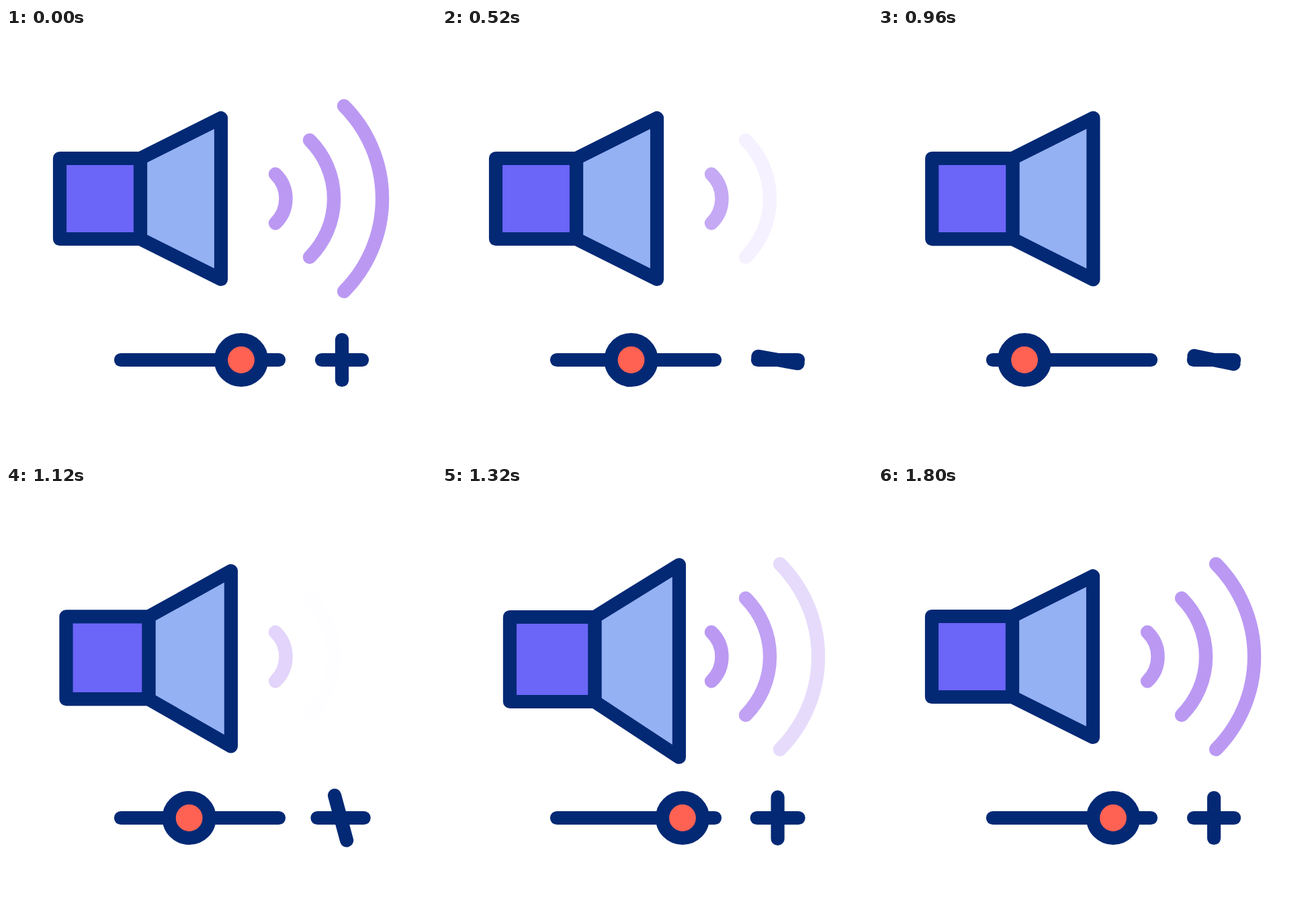
An HTML page that plays this animation: 640x640 px, repeating every 2000 ms.

```html
<!DOCTYPE html>
<html lang="en">
<head>
<meta charset="utf-8">
<title>Volume</title>
<style>
  html, body { margin: 0; width: 100%; height: 100%; overflow: hidden; background: #fff; }
  svg { display: block; width: 100vw; height: 100vh; }
  .line { stroke: #032975; stroke-width: 20.2; stroke-linecap: round; stroke-linejoin: round; }
  .wave { stroke: #bb99f3; stroke-width: 20.4; stroke-linecap: round; fill: none; }
</style>
</head>
<body>
<svg viewBox="0 0 640 640">
  <path id="cone" class="line" fill="#94b1f3"/>
  <path id="box" class="line" fill="#6b65f8"/>
  <path id="wave1" class="wave" d="M401 217.5A50.7 50.7 0 0 1 401 290.5"/>
  <path id="wave2" class="wave" d="M452 167A123 123 0 0 1 452 341"/>
  <path id="wave3" class="wave" d="M503 116A195.5 195.5 0 0 1 503 392"/>
  <path class="line" d="M171 494H406"/>
  <circle id="knob" class="line" cy="494" r="30" fill="#ff6152"/>
  <g id="lobes" fill="#032975">
    <circle cy="489" r="5"/>
    <circle cy="499" r="5"/>
  </g>
  <path id="bar" class="line"/>
  <path id="crossbar" class="line"/>
</svg>
<script>
const LOOP = 2000, STEP = 40;
const el = id => document.getElementById(id);
const lerp = (a, b, p) => a + (b - a) * p;

function ease(t, start, end) {
  const p = Math.min(1, Math.max(0, (t - start) / (end - start)));
  return p * p * (3 - 2 * p);
}

// Eased value through [time, value] keys
function track(t, ...keys) {
  let value = keys[0][1];
  for (let i = 1; i < keys.length; i++) {
    value += (keys[i][1] - keys[i - 1][1]) * ease(t, keys[i - 1][0], keys[i][0]);
  }
  return value;
}

function drawSpeaker(t) {
  const p = track(t, [933, 0], [1333, 1], [1635, 0]);
  const left = lerp(80, 101, p), mid = lerp(200, 227.4, p), right = lerp(320, 353, p);
  const top = lerp(194, 195, p), bottom = lerp(314, 321, p);
  const coneTop = lerp(134, 117.2, p), coneBottom = lerp(374, 403.8, p);
  el('box').setAttribute('d', `M${left} ${top}H${mid}V${bottom}H${left}Z`);
  el('cone').setAttribute('d', `M${mid} ${top}L${right} ${coneTop}V${coneBottom}L${mid} ${bottom}Z`);
}

function drawWaves(t) {
  const fades = [[480, 640, 1000, 1267], [367, 567, 1100, 1367], [100, 430, 1180, 1530]];
  fades.forEach(([hide, hidden, show, shown], i) => {
    el('wave' + (i + 1)).setAttribute('opacity', track(t, [hide, 1], [hidden, 0], [show, 0], [shown, 1]));
  });
}

const knobX = t => track(t, [390, 350], [645, 217], [938, 217], [1373, 364], [1633, 350]);

function drawSlider(t) {
  el('knob').setAttribute('cx', knobX(t));
  // The end of the track trails the knob on its way back
  const lobes = el('lobes');
  lobes.setAttribute('visibility', t > 1380 && t < 1640 ? 'visible' : 'hidden');
  lobes.setAttribute('transform', `translate(${knobX(t - 30) - 25} 0)`);
}

function drawPlus(t) {
  const grow = track(t, [938, 0], [1140, 1], [1390, 0]);
  const angle = track(t, [100, 0], [400, -80], [938, -80], [1190, 0]);
  const half = 30 + 4.7 * grow;
  const place = `translate(${500 - 2 * grow} 494)`;
  el('bar').setAttribute('d', `M${-half} 0H${half}`);
  el('bar').setAttribute('transform', place);
  el('crossbar').setAttribute('d', `M0 ${-half}V${half}`);
  el('crossbar').setAttribute('transform', `${place} rotate(${angle})`);
}

function draw(time) {
  const t = Math.floor((time % LOOP) / STEP) * STEP;
  drawSpeaker(t);
  drawWaves(t);
  drawSlider(t);
  drawPlus(t);
}

const begin = performance.now();
function tick() {
  draw(performance.now() - begin);
  requestAnimationFrame(tick);
}
tick();
</script>
</body>
</html>
```
